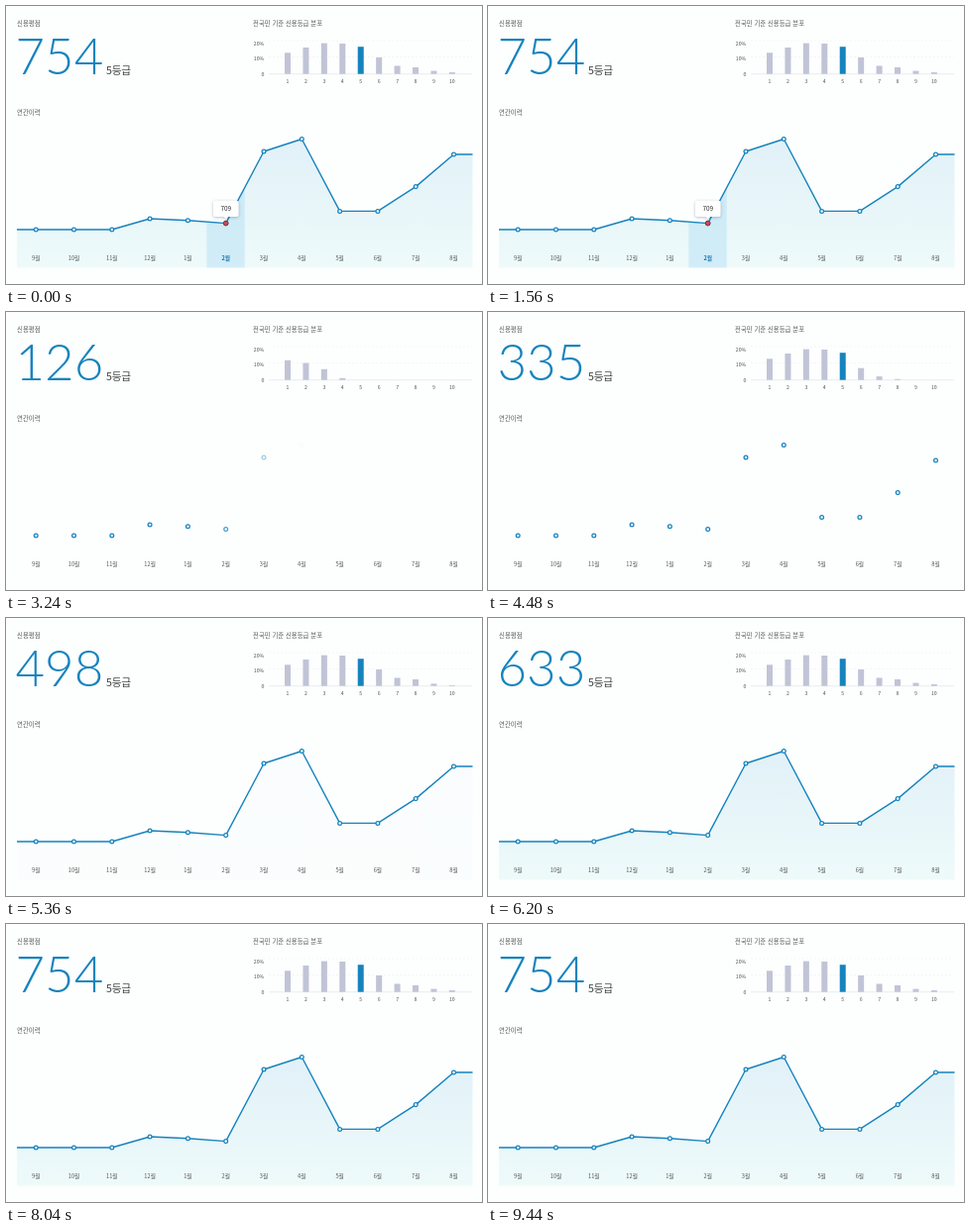
Recreate the animation shown at these times as an HTML page with a canvas. Size 480 by 281 pixels, loop 9480 ms.

```html
<!DOCTYPE html>
<html lang="ko">
<head>
<meta charset="utf-8">
<title>신용평점</title>
<style>
html, body { margin: 0; width: 480px; height: 281px; overflow: hidden; background: #fdfefe; }
canvas, svg { position: absolute; left: 0; top: 0; width: 480px; height: 281px; }
text { font-family: "Noto Sans CJK KR", "Noto Sans CJK", "Noto Sans CJK JP", "Noto Sans", sans-serif; fill: #555; }
.title { font-size: 6.4px; }
.axis { font-size: 5.2px; }
.month { font-size: 5.7px; }
.month.on { fill: #1272b0; font-weight: 700; }
#score { font: 300 51px Lato, sans-serif; fill: #1583bd; }
#grade { font-size: 10.7px; fill: #444; letter-spacing: -0.2px; }
#value { font-size: 6.4px; fill: #222; }
</style>
</head>
<body>
<canvas id="stage"></canvas>
<svg viewBox="0 0 480 281">
  <g id="labels"></g>
  <g id="head">
    <text class="title" x="11" y="20.4">신용평점</text>
    <text class="title" x="249" y="20.4">전국민 기준 신용등급 분포</text>
    <text class="title" x="11" y="110">연간이력</text>
    <text id="score" x="9.5" y="69">754</text>
    <text id="grade" x="101" y="68.7">5등급</text>
  </g>
  <text id="value" x="221.7" y="206.6" text-anchor="middle">709</text>
</svg>
<script>
const LOOP = 9480, RELOAD = 1600, AXES = 2120, START = 2360;
const BLUE = '#1583bd', PAPER = '#fdfefe', BASE = 68.7, FLOOR = 264.5;
const $ = id => document.getElementById(id);
const clamp = v => Math.max(0, Math.min(1, v));
const ramp = (t, from, length) => clamp((t - from) / length);
const swing = u => 0.5 - 0.5 * Math.cos(Math.PI * u);

const barTops = [47.3, 42, 37.6, 38, 41.2, 52, 60.5, 62, 65.6, 67];
const barX = i => 284 + i * 18.43;
const points = [226, 226, 226, 215, 216.7, 219.6, 147, 134.5, 207.4, 207.4, 182.6, 150]
  .map((y, i) => [30.2 + i * 38.3, y]);
const path = [[11, 226], ...points, [470.5, 150]];
const lengths = path.slice(1).map((p, i) => Math.hypot(p[0] - path[i][0], p[1] - path[i][1]));
const total = lengths.reduce((a, b) => a + b);

const canvas = $('stage'), ctx = canvas.getContext('2d');
const scale = window.devicePixelRatio || 1;
canvas.width = 480 * scale;
canvas.height = 281 * scale;

function label(text, x, y, cls, anchor = 'middle') {
  const el = document.createElementNS('http://www.w3.org/2000/svg', 'text');
  el.setAttribute('x', x);
  el.setAttribute('y', y);
  el.setAttribute('class', cls);
  el.setAttribute('text-anchor', anchor);
  el.textContent = text;
  $('labels').append(el);
  return el;
}
['20%', '10%', '0'].forEach((s, i) => label(s, 260.3, 40 + i * 15.4, 'axis', 'end'));
barTops.forEach((_, i) => label(i + 1, barX(i), 77.8, 'axis'));
const months = points.map((p, i) => label((i + 8) % 12 + 1 + '월', p[0], 256.8, 'month'));

function stroke(pts, color, width) {
  ctx.beginPath();
  pts.forEach(p => ctx.lineTo(...p));
  ctx.strokeStyle = color;
  ctx.lineWidth = width;
  ctx.stroke();
}

function circle(x, y, r) {
  ctx.beginPath();
  ctx.arc(x, y, r, 0, Math.PI * 2);
}

function drawGrid() {
  ctx.setLineDash([2, 2]);
  [35, 51.5].forEach(y => stroke([[265, y], [470, y]], '#eceef2', 0.6));
  ctx.setLineDash([]);
  stroke([[265, BASE], [470, BASE]], '#e2e5ec', 0.7);
}

function drawBars(t) {
  barTops.forEach((top, i) => {
    const h = (BASE - top) * ramp(t, 2310 + i * 290, 1000);
    ctx.fillStyle = i === 4 ? BLUE : '#c0c4d6';
    ctx.fillRect(barX(i) - 3, BASE - h, 6, h);
  });
}

function areaPath() {
  ctx.beginPath();
  path.forEach(p => ctx.lineTo(...p));
  ctx.lineTo(470.5, FLOOR);
  ctx.lineTo(11, FLOOR);
  ctx.closePath();
}

function drawArea(alpha, hover) {
  const fill = ctx.createLinearGradient(0, 134, 0, FLOOR);
  fill.addColorStop(0, '#e1f1f8');
  fill.addColorStop(1, '#eefafa');
  ctx.save();
  ctx.globalAlpha = alpha;
  areaPath();
  ctx.fillStyle = fill;
  ctx.fill();
  if (hover) {
    ctx.clip();
    ctx.fillStyle = 'rgba(150, 208, 238, 0.32)';
    ctx.fillRect(202.4, 130, 38.3, 135);
  }
  ctx.restore();
}

function drawLine(progress) {
  if (progress <= 0) return;
  ctx.lineJoin = 'round';
  ctx.setLineDash([total * progress, total]);
  stroke(path, BLUE, 1.4);
  ctx.setLineDash([]);
}

function drawDots(t) {
  points.forEach(([x, y], i) => {
    ctx.globalAlpha = ramp(t, 2180 + i * 150, 400);
    circle(x, y, 1.9);
    ctx.fillStyle = '#fff';
    ctx.fill();
    ctx.strokeStyle = BLUE;
    ctx.lineWidth = 1.25;
    ctx.stroke();
  });
  ctx.globalAlpha = 1;
}

function drawTip() {
  const [x, y] = points[5];
  circle(x, y, 2.4);
  ctx.fillStyle = '#d5474e';
  ctx.fill();
  ctx.strokeStyle = '#6a3546';
  ctx.lineWidth = 0.9;
  ctx.stroke();

  ctx.save();
  ctx.shadowColor = 'rgba(40, 60, 80, 0.35)';
  ctx.shadowBlur = 3 * scale;
  ctx.shadowOffsetY = 0.7 * scale;
  ctx.fillStyle = '#fff';
  ctx.beginPath();
  ctx.roundRect(209, 196.7, 25.6, 16.3, 2);
  ctx.moveTo(x - 2.2, 213);
  ctx.lineTo(x + 2.2, 213);
  ctx.lineTo(x, 215.3);
  ctx.fill();
  ctx.restore();
}

function render(t) {
  const hover = t < RELOAD;
  const live = hover || t >= START;
  const at = hover ? LOOP : t;

  ctx.setTransform(scale, 0, 0, scale, 0, 0);
  ctx.fillStyle = PAPER;
  ctx.fillRect(0, 0, 480, 281);

  $('labels').style.display = hover || t >= AXES ? '' : 'none';
  $('head').style.display = live ? '' : 'none';
  $('value').style.display = hover ? '' : 'none';
  months[5].classList.toggle('on', hover);
  $('score').textContent = Math.round(754 * swing(ramp(at, 1550, 6305)));

  if (hover || t >= AXES) drawGrid();
  if (!live) return;
  drawBars(at);
  drawArea(ramp(at, 5250, 900), hover);
  drawLine(ramp(at, 4500, 800));
  drawDots(at);
  if (hover) drawTip();
}

const begin = performance.now();
function tick() {
  render((performance.now() - begin) % LOOP);
  requestAnimationFrame(tick);
}
tick();
</script>
</body>
</html>
```
